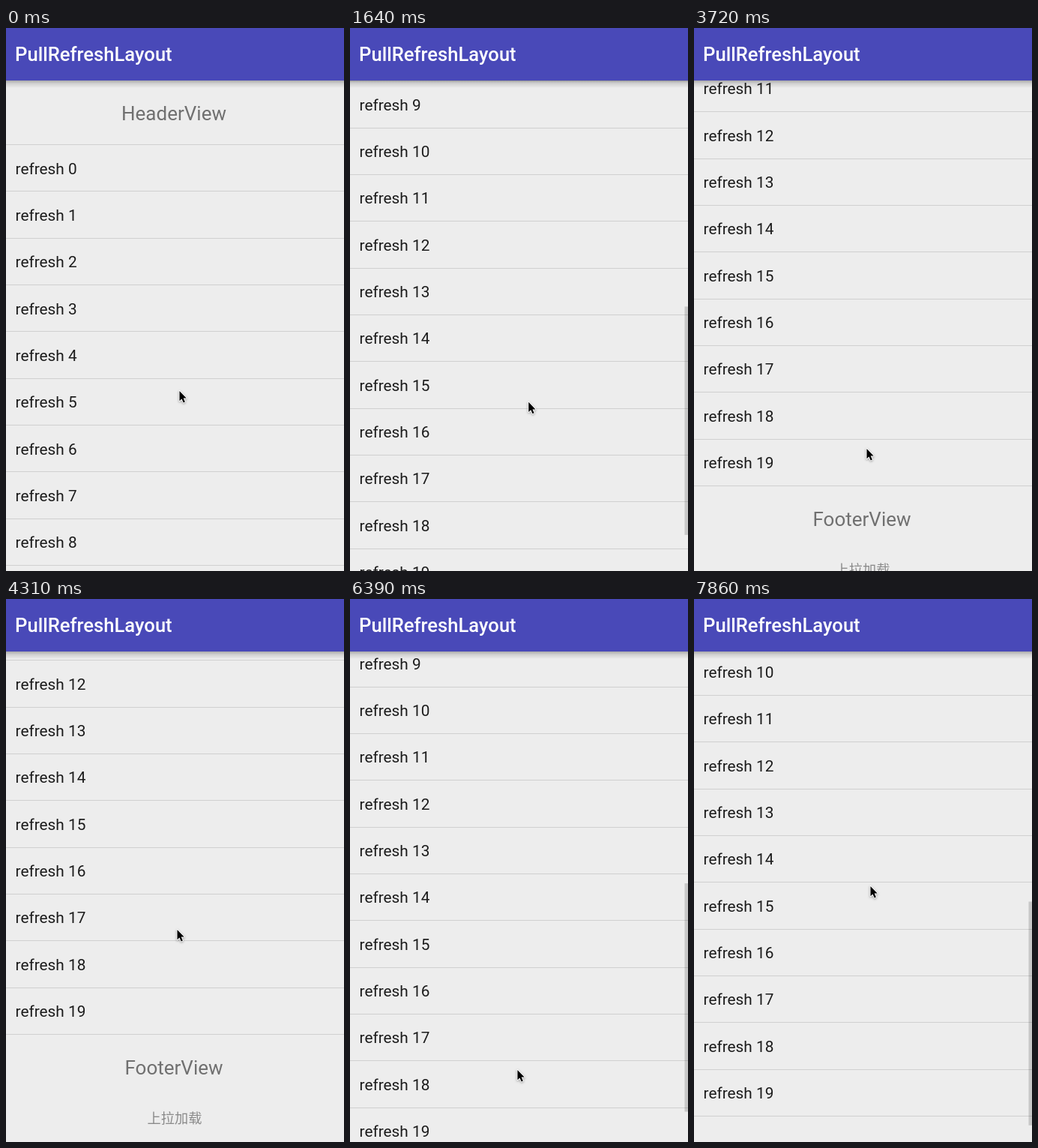
Recreate the animation shown at these times as an HTML page with a canvas. Size 451 by 724 pixels, loop 8 s.

```html
<!DOCTYPE html>
<html lang="en">
<head>
<meta charset="utf-8">
<title>PullRefreshLayout</title>
<style>
html, body { margin: 0; width: 100%; height: 100%; overflow: hidden; background: #ededed; }
canvas { display: block; }
</style>
</head>
<body>
<canvas id="stage" width="451" height="724"></canvas>
<script>
const ctx = document.getElementById('stage').getContext('2d');
const W = 451, H = 724, BAR = 70;
const LOOP = 8000, STEP = 148.25;
const ROWS = 20, PITCH = 62.35, LIST_TOP = 155;
const LOAD_START = 31, LOAD_END = 40;
const CJK = '18.2px "Noto Sans CJK SC", "Noto Sans CJK", sans-serif';

// [step, value] pairs
const scrollKeys = [[0, 0], [2, 90], [7, 428], [12, 700], [15, 764], [17, 764],
  [25, 792], [29, 822], [32, 814], [40, 814], [41, 764], [43, 662], [46, 632], [53, 713]];
const xKeys = [[0, 231], [7, 231], [17, 248], [25, 230], [33, 226], [43, 223], [53, 235]];
const yKeys = [[0, 484], [7, 462], [17, 554], [25, 561], [29, 441], [33, 441],
  [40, 470], [43, 628], [46, 640], [53, 383]];

function at(keys, n) {
  const i = keys.findIndex(k => k[0] >= n);
  if (i < 0) return keys[keys.length - 1][1];
  if (i === 0) return keys[0][1];
  const [n0, v0] = keys[i - 1], [n1, v1] = keys[i];
  return v0 + (v1 - v0) * (n - n0) / (n1 - n0);
}

function label(text, x, y, font, color, align = 'left') {
  ctx.font = font;
  ctx.fillStyle = color;
  ctx.textAlign = align;
  ctx.fillText(text, x, y);
}

function drawList(scroll) {
  const big = '26px Roboto, sans-serif';
  label('HeaderView', 224, 122.5 - scroll, big, '#707070', 'center');
  for (let i = 0; i <= ROWS; i++) {
    const y = LIST_TOP + PITCH * i - scroll;
    ctx.fillStyle = '#d0d0d0';
    ctx.fillRect(0, Math.round(y), W, 1);
    if (i < ROWS) label('refresh ' + i, 12.6, y + 39.5, '20.8px Roboto, sans-serif', '#1c1c1c');
  }
  label('FooterView', 224, 1456 - scroll, big, '#707070', 'center');
}

function drawSpinner(x, y, turn) {
  const g = ctx.createConicGradient(1.4 + turn, x, y);
  g.addColorStop(0, '#f4f4f4');
  g.addColorStop(0.45, '#e6e6e6');
  g.addColorStop(1, '#b8b8b8');
  ctx.strokeStyle = g;
  ctx.lineWidth = 2;
  ctx.beginPath();
  ctx.arc(x, y, 11, 0, Math.PI * 2);
  ctx.stroke();
}

function drawLoader(n, scroll) {
  const y = 1520.6 - scroll;
  if (n >= LOAD_START && n <= LOAD_END) {
    drawSpinner(157.5, y - 7, (n - 33) * STEP / 1000 * Math.PI * 2);
    label('正在加载数据', 186, y, CJK, '#8a8a8a');
  } else {
    label('上拉加载', 225, y, CJK, '#8a8a8a', 'center');
  }
}

function drawScrollbar(n, scroll) {
  if (n === 0 || (n > 20 && n <= LOAD_END)) return;
  const s = Math.min(scroll, 764);
  const top = s < 428 ? BAR + s * 0.46 : 267 + (s - 428) * 0.479;
  const len = 304.5 - Math.max(0, s - 662) * 0.122;
  ctx.fillStyle = 'rgba(0,0,0,0.16)';
  ctx.fillRect(446.5, top, 4.5, len);
}

function drawToolbar() {
  const g = ctx.createLinearGradient(0, BAR, 0, BAR + 10);
  g.addColorStop(0, 'rgba(0,0,0,0.28)');
  g.addColorStop(0.4, 'rgba(0,0,0,0.12)');
  g.addColorStop(1, 'rgba(0,0,0,0)');
  ctx.fillStyle = g;
  ctx.fillRect(0, BAR, W, 10);
  ctx.fillStyle = '#4949b8';
  ctx.fillRect(0, 0, W, BAR);
  label('PullRefreshLayout', 12.1, 44, '500 25.6px Roboto, sans-serif', '#fff');
}

function drawCursor(x, y) {
  const arrow = new Path2D('M0 0V13.2L3 10.4L5.2 15.4L7.4 14.4L5.2 9.6H9.2Z');
  ctx.save();
  ctx.translate(x + 0.5, y);
  ctx.lineJoin = 'round';
  ctx.shadowColor = 'rgba(0,0,0,0.35)';
  ctx.shadowBlur = 3;
  ctx.shadowOffsetY = 1;
  ctx.strokeStyle = '#fff';
  ctx.lineWidth = 2;
  ctx.stroke(arrow);
  ctx.shadowColor = 'transparent';
  ctx.fillStyle = '#000';
  ctx.fill(arrow);
  ctx.restore();
}

function draw(n) {
  const scroll = Math.round(at(scrollKeys, n));
  ctx.fillStyle = '#ededed';
  ctx.fillRect(0, 0, W, H);
  drawList(scroll);
  drawLoader(n, scroll);
  drawScrollbar(n, scroll);
  drawToolbar();
  drawCursor(at(xKeys, n), at(yKeys, n));
}

const start = performance.now();
function tick() {
  draw(Math.floor((performance.now() - start) % LOOP / STEP));
  requestAnimationFrame(tick);
}
tick();
</script>
</body>
</html>
```
